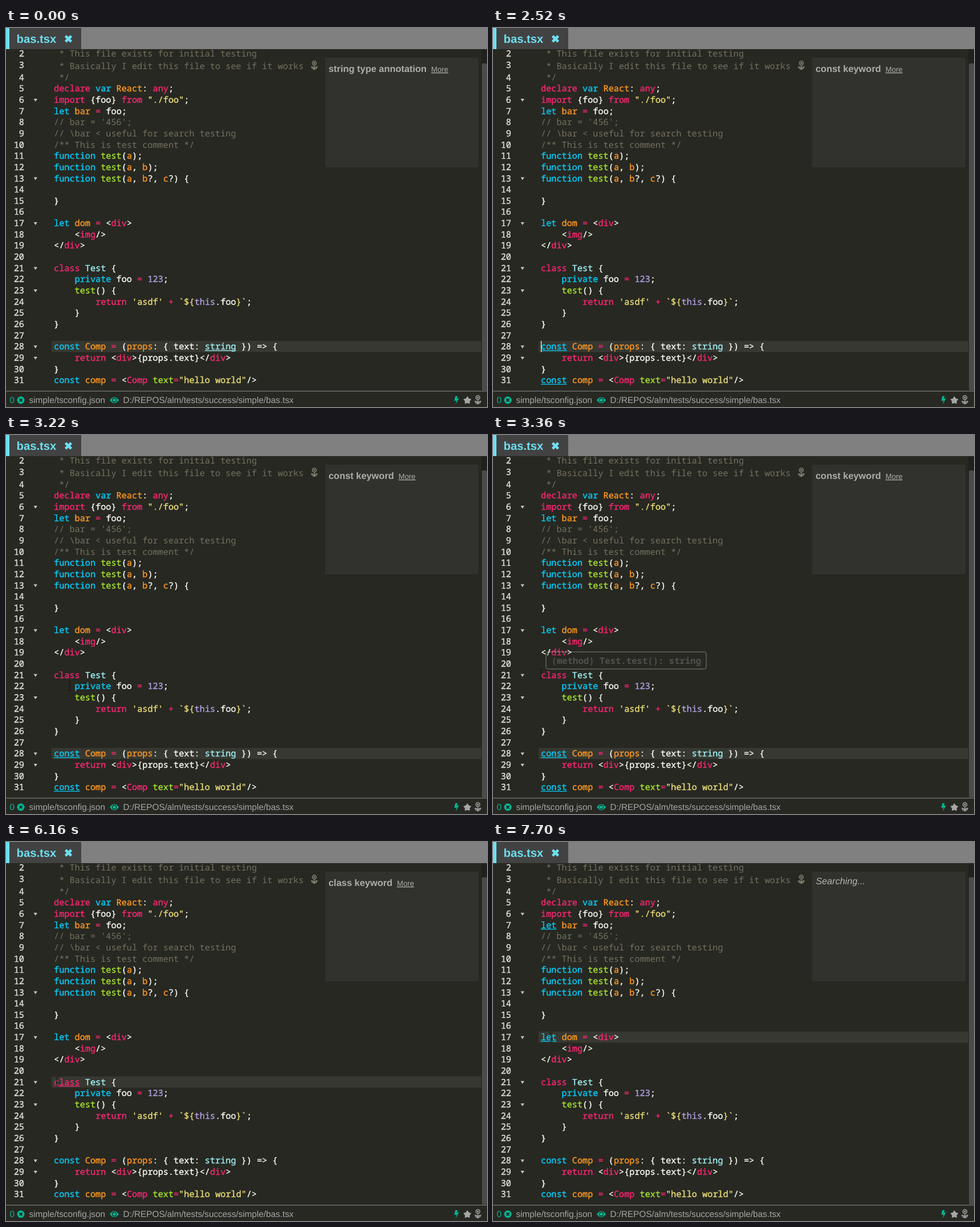
Animation of 844x664 px, one loop 8 s. Source, as an HTML page:

```html
<!DOCTYPE html>
<html lang="en">
<head>
<meta charset="utf-8">
<title>Code editor</title>
<style>
  html, body { margin: 0; width: 100%; height: 100%; overflow: hidden; background: #272822; }
  svg { display: block; width: 100%; height: 100%; }
  text { white-space: pre; text-rendering: geometricPrecision; font-family: "Liberation Sans", Arial, sans-serif; }
  .code text {
    font: 500 15.22px "Noto Sans Mono", "DejaVu Sans Mono", monospace;
    color: #f8f8f2; fill: currentColor; stroke: currentColor; stroke-width: .4;
  }
  .code tspan { fill: currentColor; stroke: currentColor; }
  .code .num { color: #e0e0da; text-anchor: end; }
  .p { color: #f92672; } .b { color: #05ccf8; } .o { color: #fd971f; }
  .g { color: #a6e22e; } .y { color: #e6db74; } .v { color: #ae9bdc; }
  .code .c { color: #75715e; stroke: none; } .t { color: #9feff2; }
  .status text { font-size: 15.3px; fill: #a6a6a6; }
  .status .green { fill: #00b894; }
  #tip text { font: bold 15.63px "Noto Sans Mono", "DejaVu Sans Mono", monospace; fill: #e0e0e0; }
</style>
</head>
<body>
<svg viewBox="0 0 844 664" xmlns="http://www.w3.org/2000/svg">
  <defs>
    <g id="flower" fill="none" stroke="currentColor" stroke-width="1.300">
      <circle cy="-4.500" r="3.600"/>
      <circle cy="-4.500" r="1.200"/>
      <path d="M0-1v8.500M0 6q-1-4-5-4 1 4 5 4 1-4 5-4-1 4-5 4"/>
    </g>
  </defs>
  <rect width="844" height="664" fill="#272822"/>
  <rect id="active" x="80" width="754" height="19.6" fill="#373832"/>
  <g id="code" class="code"></g>
  <use href="#flower" x="541" y="66" color="#8a8672"/>
  <g id="underlines"></g>
  <rect id="caret" width="1.2" height="19.6" fill="#f8f8f0"/>

  <g id="doc">
    <rect x="560" y="52" width="269" height="192" fill="#31322d"/>
    <text id="title" x="566" y="77" font-size="16.4" font-weight="bold" fill="#adadaa"><tspan id="titleText"></tspan><tspan dx="8" font-size="13.1" font-weight="normal" text-decoration="underline">More</tspan></text>
    <text id="searching" x="566.500" y="74" font-size="16.2" font-style="italic" fill="#b4b4b0">Searching...</text>
  </g>

  <rect x="834" y="37" width="10" height="599" fill="#20211c"/>
  <rect x="835" y="62" width="9" height="573" rx="2" fill="#4b4b49"/>

  <rect width="844" height="37" fill="#808080"/>
  <rect width="132" height="37" fill="#424242"/>
  <rect width="6" height="37" fill="#6edff0"/>
  <text x="18.5" y="26" font-size="20.3" font-weight="bold" fill="#6edff0">bas.tsx</text>
  <path d="M104.500 14l10 10m0-10l-10 10" stroke="#6edff0" stroke-width="4.600"/>

  <g class="status">
    <rect y="636" width="844" height="28" fill="#272822"/>
    <rect y="635.500" width="844" height="1.500" fill="#6b6b68"/>
    <text class="green" x="6.500" y="657">0</text>
    <circle class="green" cx="26" cy="652" r="6.500"/>
    <path d="M23.500 649.500l5 5m0-5l-5 5" stroke="#272822" stroke-width="2"/>
    <text x="40.500" y="657">simple/tsconfig.json</text>
    <path class="green" d="M182 652q8-10.500 16 0q-8 10.500-16 0z"/>
    <circle cx="190" cy="652" r="4.200" fill="#272822"/>
    <circle class="green" cx="190" cy="652" r="2.800"/>
    <text x="205.500" y="657">D:/REPOS/alm/tests/success/simple/bas.tsx</text>
    <path class="green" d="M788.500 645h4l-1.500 4.500 4-1-6 11 1.500-7-4 1z"/>
    <path id="badge" fill="#a6a6a6"/>
    <use href="#flower" x="828" y="652" color="#a6a6a6"/>
  </g>

  <g id="tip">
    <rect x="1" y="1" height="30" rx="4" fill="#272822" stroke="#f0f0f0" stroke-width="2"/>
    <text x="10.500" y="22"></text>
  </g>
  <path id="pointer" d="M-3-8h2.500m1 0h2.500M0-8v16M-3 8h2.500m1 0h2.500" fill="none" stroke="#151612"/>
</svg>
<script>
const $ = id => document.getElementById(id);
const LOOP = 8000, STEP = 70, BLINK = 470, CHAR = 9.13, LEFT = 84;

// ~xword~ colours a word with class x
const lines = [
  "~c * This file exists for initial testing~",
  "~c * Basically I edit this file to see if it works ~",
  "~c */~",
  "~pdeclare~ ~bvar~ ~oReact~: ~pany~;",
  '~pimport~ {foo} ~pfrom~ ~y"./foo"~;',
  "~blet~ ~obar~ ~p=~ foo;",
  "~c// bar = '456';~",
  "~c// \\bar < useful for search testing~",
  "~c/** This is test comment */~",
  "~bfunction~ ~gtest~(~oa~);",
  "~bfunction~ ~gtest~(~oa~, ~ob~);",
  "~bfunction~ ~gtest~(~oa~, ~ob~?, ~oc~?) {",
  "", "}", "",
  "~blet~ ~odom~ ~p=~ <~pdiv~>",
  "    <~pimg~/>",
  "</~pdiv~>",
  "",
  "~pclass~ ~tTest~ {",
  "    ~bprivate~ foo ~p=~ ~v123~;",
  "    ~gtest~() {",
  "        ~preturn~ ~y'asdf'~ ~p+~ ~y`${~~vthis~.foo~y}`~;",
  "    }", "}", "",
  "~bconst~ ~oComp~ ~p=~ (~oprops~: { text: ~tstring~ }) => {",
  "    ~preturn~ <~pdiv~>{props.text}</~pdiv~>",
  "}",
  '~bconst~ ~ocomp~ ~p=~ <~pComp~ ~gtext~~p=~~y"hello world"~/>'
];
const folds = [6, 13, 17, 21, 23, 28, 29];
const middle = n => n < 5 ? [45, 65, 86.5][n - 2] : 106.2 + (n - 5) * 19.645;
const escapeHtml = s => s.replace(/&/g, "&amp;").replace(/</g, "&lt;").replace(/>/g, "&gt;");
const paint = s => escapeHtml(s).replace(/~(\w)(.*?)~/g, '<tspan class="$1">$2</tspan>');

$("code").innerHTML = lines.map((line, i) => {
  const n = i + 2, y = middle(n) + 5.2;
  const arrow = folds.includes(n) ? `<path d="M48.500 ${y - 7}h6.500l-3.250 5z" fill="#c4c4be"/>` : "";
  return `<text class="num" x="32" y="${y}">${n}</text>${arrow}
    <text x="${LEFT}" y="${n === 3 ? y + 2 : y}">${paint(line)}</text>`;
}).join("");

$("badge").setAttribute("d", "M" + Array.from({ length: 10 }, (_, i) => {
  const r = i % 2 ? 4.4 : 7.4, a = i * Math.PI / 5;
  return [809.5 + r * Math.sin(a), 652.5 - r * Math.cos(a)].map(v => v.toFixed(1));
}).join("L") + "Z");

// Each table row: start time, then the values held from there on
const carets = [[0, 368, 28, 70], [630, 84, 28, 630], [3780, 94, 21, 3770], [7210, 102, 17, 7210]];
const panels = [[0, "string type annotation"], [630, ""], [1680, "const keyword"],
  [3780, ""], [4760, "class keyword"], [7210, ""]];
const marks = [[0, "t", 29, 6, [28]], [770, "b", 0, 5, [28, 31]],
  [3850, "p", 0, 5, [21]], [7350, "b", 0, 3, [7, 17]]];
const tips = [[0, "(parameter) props: { text: string; }"], [3220, "(method) Test.test(): string"]];

// Interpolated tables
const pointerPath = [[2730, 240, 646], [2870, 225, 577], [3080, 139, 460], [3360, 84, 419],
  [3570, 89, 420], [6300, 89, 420], [6650, 79, 382], [6930, 100, 334], [7070, 102, 342]];
const tipFade = [[2940, 0], [3080, .46], [3150, .46], [3220, 0], [3290, .35], [3360, .22], [3500, 0]];

const held = (table, t) => table.filter(row => row[0] <= t).pop();
function along(table, t) {
  const next = table.findIndex(row => row[0] > t);
  if (next === 0) return table[0].slice(1);
  if (next < 0) return table[table.length - 1].slice(1);
  const a = table[next - 1], b = table[next], k = (t - a[0]) / (b[0] - a[0]);
  return a.slice(1).map((v, i) => v + (b[i + 1] - v) * k);
}
const set = (el, attrs) => { for (const key in attrs) el.setAttribute(key, attrs[key]); };
const show = (el, on) => set(el, { visibility: on ? "visible" : "hidden" });

function draw(t) {
  const [, x, row, since] = held(carets, t);
  set($("active"), { y: middle(row) - 9.8 });
  set($("caret"), { x, y: middle(row) - 9.8 });
  show($("caret"), Math.floor((t - since) / BLINK) % 2 === 0);

  const title = held(panels, t)[1];
  $("titleText").textContent = title;
  show($("title"), title);
  show($("searching"), !title);

  const [, color, column, length, rows] = held(marks, t);
  $("underlines").innerHTML = rows.map(n =>
    `<rect class="${color}" fill="currentColor" x="${LEFT + column * CHAR}" y="${middle(n) + 6.6}" width="${length * CHAR}" height="1.300"/>`
  ).join("");

  const [px, py] = along(pointerPath, t);
  set($("pointer"), { transform: `translate(${px} ${py})` });
  show($("pointer"), t >= 2730);

  const label = held(tips, t)[1], tip = $("tip");
  tip.querySelector("text").textContent = label;
  set(tip.querySelector("rect"), { width: label.length * 9.38 + 18.5 });
  set(tip, { transform: `translate(${px + 8} ${py - 40})`, opacity: along(tipFade, t)[0] });
}

const start = performance.now();
let last = -1;
function tick() {
  const elapsed = Math.max(0, performance.now() - start) % LOOP;
  const t = Math.floor(elapsed / STEP) * STEP;
  if (t !== last) draw(last = t);
  requestAnimationFrame(tick);
}
tick();
</script>
</body>
</html>
```
